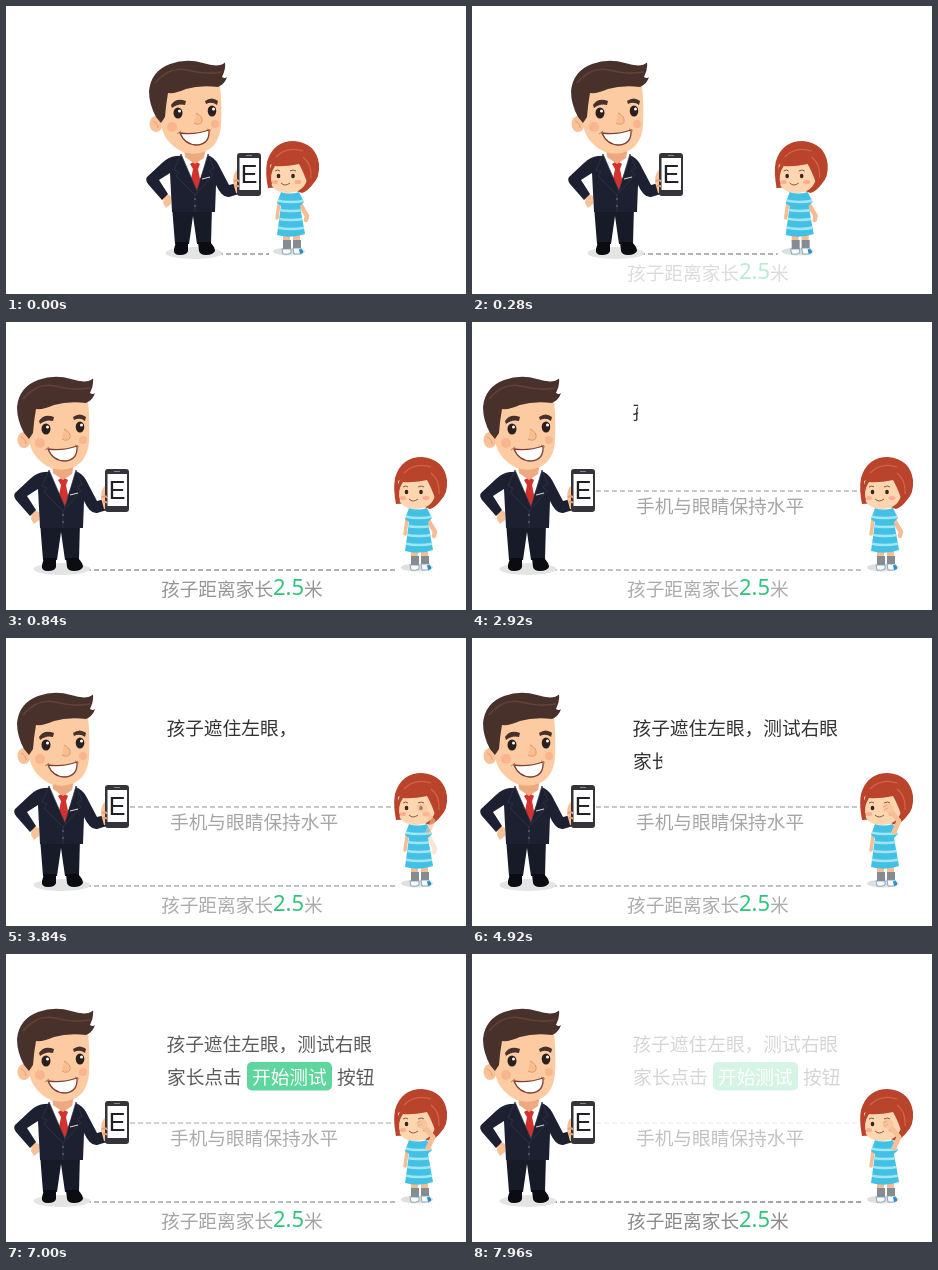
Write an HTML page that moves like this. It is 460 px wide and 288 px high and loops after 8000 ms.

```html
<!DOCTYPE html>
<html lang="zh-CN">
<head>
<meta charset="utf-8">
<style>
html, body { margin: 0; width: 100%; height: 100%; overflow: hidden; background: #fff; }
svg { display: block; width: 460px; height: 288px; }
text { font-family: "Noto Sans CJK SC", "Noto Sans CJK", sans-serif; font-size: 18.7px; font-weight: 300; }
.number { font-family: "Noto Sans", sans-serif; font-size: 22px; font-weight: 500; fill: #2fc47c; }
.letter { font-family: "Liberation Sans", Arial, sans-serif; font-size: 25px; font-weight: 500; }
.dash { stroke-width: 1.3; stroke-dasharray: 5 3; }
</style>
</head>
<body>
<svg viewBox="0 0 460 288">
  <defs>
    <clipPath id="clip1"><rect id="wipe1" x="161" y="78" height="26"/></clipPath>
    <clipPath id="clip2"><rect id="wipe2" x="161" y="106" height="32"/></clipPath>
    <clipPath id="dressClip"><path id="dressShape" d="M403 186 Q412 189 421 186 L426 196 L422 200 L427 228 Q413 233 399 229 L403 200 L399 197Z"/></clipPath>
  </defs>

  <line id="floor" class="dash" y1="248" y2="248"/>
  <g id="floorText">
    <text id="floorGray" y="273.5"><tspan x="155">孩子距离家长</tspan><tspan x="298">米</tspan></text>
    <text class="number" x="267" y="273">2.5</text>
  </g>

  <line id="level" class="dash" x1="124" x2="390" y1="169" y2="169" stroke="#b4b4b4"/>
  <text id="levelText" x="164" y="191" fill="#a6a6a6">手机与眼睛保持水平</text>

  <g id="steps" fill="#333">
    <text clip-path="url(#clip1)" x="160.5" y="97">孩子遮住左眼，测试右眼</text>
    <g clip-path="url(#clip2)">
      <text x="161" y="129.5">家长点击</text>
      <rect x="241" y="108" width="85" height="28.500" rx="5" fill="#37cd87"/>
      <text x="246" y="129.500" fill="#fff">开始测试</text>
      <text x="331" y="129.500">按钮</text>
    </g>
  </g>

  <g id="man">
    <ellipse cx="56" cy="247" rx="28.500" ry="6" fill="#e4e4e4"/>
    <!-- legs and shoes -->
    <path d="M34 200 H74 L73 238 H59 L55 210 L51 238 H37Z" fill="#171b28"/>
    <path d="M38 236 H50 V245 Q49 249 42 249 Q35 249 36 243Z M60 236 H72 Q77 241 77 245 Q75 249 68 249 Q62 249 61 245Z" fill="#0b0c12"/>
    <!-- jacket and arms -->
    <path d="M26 187 l7 3 v8 l-5 4 -3 -5Z" fill="#f8c197"/>
    <path d="M38 150 Q30 151 24 157 L9 171 Q7 174 10 178 L24 194 L30 188 L21 174 L32 167 L34 206 H77 L78 179 Q84 192 91 191 L101 188 L99 177 L91 179 L80 158 Q76 151 69 149Z" fill="#1c2030"/>
    <path d="M43 149 L57 187 L71 149Z" fill="#fff"/>
    <path d="M52 158 L57 155 L62 158 L60 163 L63 178 L58 185 L52 178 L55 163Z" fill="#d3322f"/>
    <path d="M43 148 L36 164 L41 166 L38 170 L57 189 L75 169 L71 165 L76 162 L70 148 L59 185Z M57 189 V206" fill="#1c2030" stroke="#343a4c" stroke-width=".7"/>
    <path d="M64 173 l8 -2" stroke="#ddd"/>
    <g fill="#565c6b"><circle cx="57" cy="193" r="1"/><circle cx="57" cy="200" r="1"/></g>
    <path d="M46 142 H68 L66 152 L57 158 L47 151Z" fill="#edaa80"/>
    <!-- head -->
    <ellipse cx="18" cy="118" rx="6.500" ry="8" fill="#f8c197"/>
    <path d="M15 115 q5 2 5 7" fill="none" stroke="#e39d74"/>
    <path d="M23 84 Q50 76 82 80 Q84 95 83 120 Q81 139 68 145 Q57 150 45 146 Q27 138 23 119Z" fill="#fdcba2"/>
    <path d="M18 111 Q11 98 11 85 Q13 65 32 58 Q49 52 65 57 Q81 62 87 56.500 Q88 63 84 71 Q87 73 89 71 Q87 78 80 81 Q62 79 48 83 Q37 88 30 87 Q28 98 27 111 L23 117Z" fill="#49312b"/>
    <path d="M17 77 Q31 60 49 64 Q68 69 84 66" fill="none" stroke="#614139" stroke-width="1.500"/>
    <path d="M33 99 Q38 91 48 95 L47 99 Q40 97 34 102Z M67 95 Q74 90 80 95 L79 99 Q74 95 68 98Z" fill="#49312b"/>
    <g fill="#2a2020"><ellipse cx="40" cy="107" rx="4.500" ry="5.500"/><ellipse cx="74" cy="105" rx="4.300" ry="5.500"/></g>
    <g fill="#fff"><circle cx="41.500" cy="105" r="1.500"/><circle cx="75.500" cy="103" r="1.500"/></g>
    <path d="M58 107 Q65 110 64 116 Q61 120 56 117" fill="#f8bd91" stroke="#df996c"/>
    <g fill="#f9b58e"><circle cx="34" cy="121" r="5"/><circle cx="77" cy="118" r="4"/></g>
    <path d="M42 127 Q57 129 71 124 Q72 138 59 139 Q47 139 42 127Z" fill="#fff" stroke="#823f34" stroke-width="1.300"/>
    <path d="M39 128 l4 -3 M69 123 l4 2" stroke="#c17656"/>
    <!-- phone -->
    <path d="M95 176 Q95 166 100 163 L104 166 V188 L98 187Z" fill="#f8c197"/>
    <rect x="99" y="147" width="24" height="43" rx="3" fill="#34343a"/>
    <rect x="101.500" y="152" width="19.500" height="32" fill="#fff"/>
    <text class="letter" x="111" y="177" text-anchor="middle" fill="#202024">E</text>
    <path d="M108 149.500 h6" stroke="#888"/>
    <path d="M96 175 q4 -2 5 1 M97 180 q3 -1 4 1" fill="none" stroke="#e1a178" stroke-width="2"/>
  </g>

  <g id="girl">
    <ellipse cx="411" cy="245.500" rx="16" ry="4" fill="#dfdfdf"/>
    <path d="M405 227 h7 v10 h-7Z M415 227 h7 v10 h-7Z" fill="#f4bd94"/>
    <path d="M405 234 h8 v9 h-8Z M415 234 h8 v9 h-8Z" fill="#858b91"/>
    <path d="M404 243 h9 v4 q-3 2 -8 1Z M415 242 h8 q3 4 0 6 h-7Z" fill="#f6faff" stroke="#7797ae" stroke-width=".8"/>
    <path d="M421 243 q5 0 4 4 l-3 1Z" fill="#258fca"/>
    <path id="armDown" d="M422 198 L429 210 L428 214" fill="none" stroke="#f5bd94" stroke-width="4.500" stroke-linecap="round" stroke-linejoin="round"/>
    <path d="M401 198 L399 212" stroke="#f5bd94" stroke-width="3.500" stroke-linecap="round"/>
    <use href="#dressShape" fill="#43c1e5"/>
    <g clip-path="url(#dressClip)" fill="none" stroke="#a2e6f5" stroke-width="2.500">
      <path d="M397 194 q16 4 32 0 M397 203 q16 4 32 0 M397 212 q16 4 32 0 M397 221 q16 4 32 0"/>
    </g>
    <path d="M390 182 Q387 167 389 156 Q395 135 416 135 Q438 137 441 158 Q442 171 435 178 Q430 185 424 187 L407 181Z" fill="#b9432b"/>
    <path d="M392 159 Q407 151 423 157 Q430 163 429 174 Q425 187 409 187 Q396 187 392 176Z" fill="#fdd5af"/>
    <path d="M390 182 Q389 163 397 153 Q409 144 425 152 Q433 160 429 176 Q425 165 421 158 Q406 161 397 160 Q391 169 394 178Z" fill="#b9432b"/>
    <path d="M398 151 Q409 140 425 145 M425 151 Q434 158 433 172" fill="none" stroke="#d46444" stroke-width="1.300"/>
    <ellipse cx="400.500" cy="170" rx="1.800" ry="2.300" fill="#372522"/>
    <ellipse cx="415" cy="170" rx="1.800" ry="2.300" fill="#372522"/>
    <path d="M397 165 q3 -2 5 0 M412 165 q4 -2 6 0 M403 177 q4 4 9 0" fill="none" stroke="#79493a" stroke-width=".9"/>
    <g fill="#f9ae91"><ellipse cx="397" cy="176" rx="3" ry="2"/><ellipse cx="420" cy="176" rx="3.500" ry="2"/></g>
    <g id="armUp">
      <path d="M422 194 L427 183 L417 171" fill="none" stroke="#f5c097" stroke-width="5" stroke-linecap="round" stroke-linejoin="round"/>
      <ellipse cx="416" cy="170" rx="5.500" ry="4.500" fill="#f9c69d"/>
      <path d="M411 169 l4 -2 M412 172 l4 -2" stroke="#dfa37c" stroke-width=".8"/>
    </g>
  </g>
</svg>
<script>
const $ = id => document.getElementById(id);
const ramp = (t, start, end) => Math.max(0, Math.min(1, (t - start) / (end - start)));
const mix = (a, b, p) => a + (b - a) * p;
const gray = v => `rgb(${v},${v},${v})`;
const set = (id, values) => {
  for (const key in values) $(id).setAttribute(key, values[key]);
};

function draw(t) {
  const apart = ramp(t, 0, 840);
  const manX = 132 * (1 - apart), girlX = -128 * (1 - apart);
  set("man", { transform: `translate(${manX})` });
  set("girl", { transform: `translate(${girlX})` });

  const dim = ramp(t, 840, 1680), leave = ramp(t, 6680, 8280);
  const tone = mix(mix(150, 172, dim), 130, leave);
  set("floor", { x1: 80 + manX, x2: 391 + girlX, stroke: gray(tone) });
  set("floorText", { opacity: apart });
  set("floorGray", { fill: gray(tone) });

  set("level", { opacity: dim * (1 - leave) });
  set("levelText", { opacity: dim * (1 - leave * 0.4) });

  set("wipe1", { width: 205 * ramp(t, 2880, 4480) });
  set("wipe2", { width: 76 * ramp(t, 4720, 5240) + 133 * ramp(t, 5440, 6120) });
  set("steps", { opacity: 1 - leave });

  const cover = ramp(t, 3600, 4000);
  set("armUp", { opacity: cover });
  set("armDown", { opacity: 1 - cover });
}

const began = performance.now();
function tick() {
  const t = (performance.now() - began) % 8000;
  draw(Math.floor(t / 40) * 40);
  requestAnimationFrame(tick);
}
tick();
</script>
</body>
</html>
```
